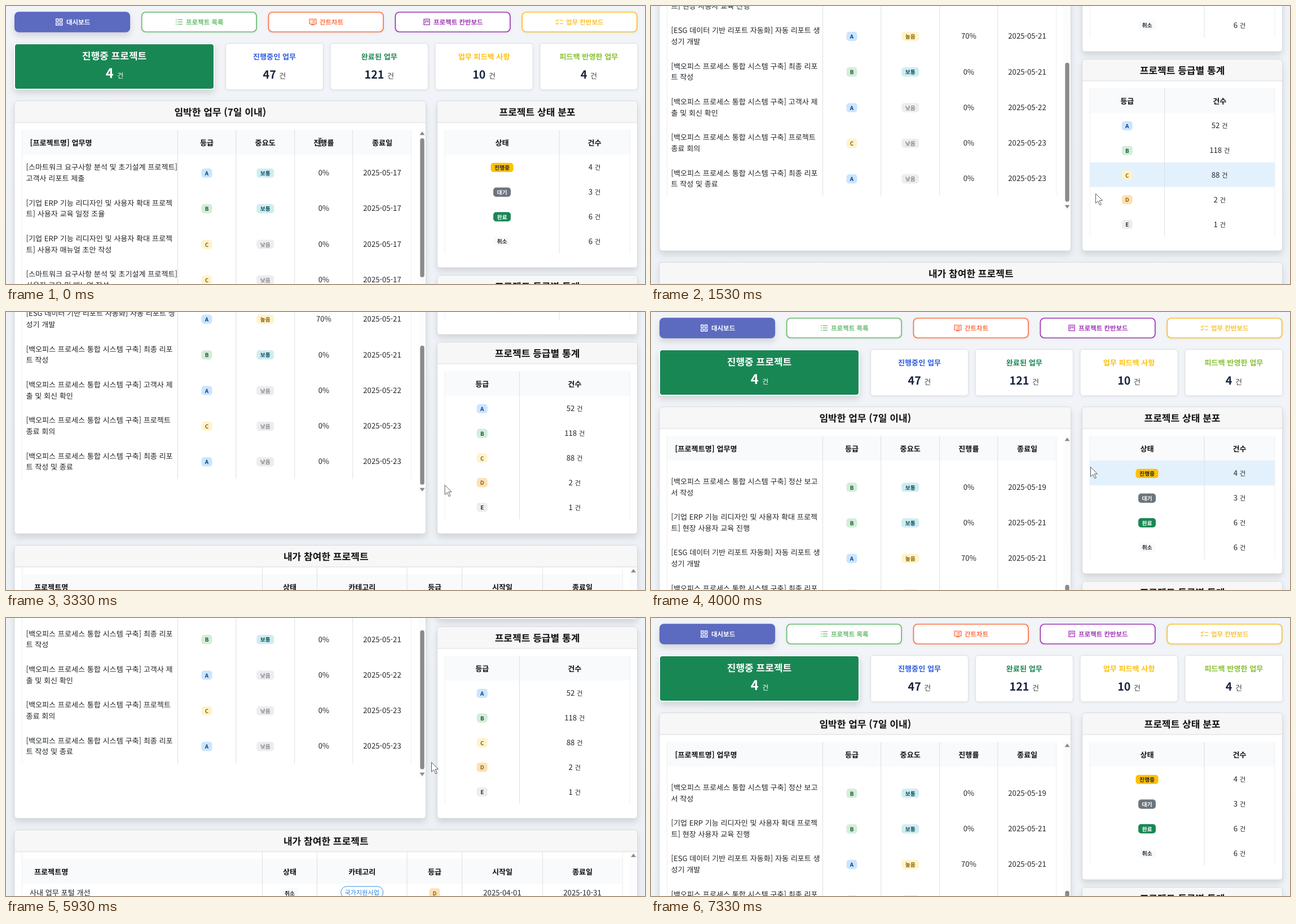
An HTML page for the animation above (7.74 s loop, 1133 px wide and 494 px high).

```html
<!DOCTYPE html>
<html lang="ko">
<head>
<meta charset="utf-8">
<style>
html, body { margin: 0; height: 100%; overflow: hidden; background: #eff3f7; }
svg { display: block; width: 1133px; height: 494px; font-family: 'Noto Sans CJK KR', 'Noto Sans KR', 'Noto Sans CJK', sans-serif; text-rendering: geometricPrecision; }
.deep { filter: drop-shadow(0 6px 6px rgba(0,0,0,.13)); }
.soft { filter: drop-shadow(0 1.5px 2px rgba(0,0,0,.07)); }
</style>
</head>
<body>
<svg id="stage" viewBox="0 0 1133 494"></svg>
<script>
const INK = '#212529', BASE = 13.12, ROW = 63.3, ROW2 = 45;

// ---- drawing helpers; text y is the visual middle of the glyphs
const text = (x, y, s, { size = BASE, fill = INK, w = 400, at = 'middle' } = {}) =>
  `<text x="${x}" y="${y + size * .37}" font-size="${size}" fill="${fill}" font-weight="${w}" text-anchor="${at}">${s}</text>`;
const rect = (x, y, w, h, fill, r = 0, more = '') =>
  `<rect x="${x}" y="${y}" width="${w}" height="${h}" rx="${r}" fill="${fill}" ${more}/>`;
const path = (d, more) => `<path d="${d}" ${more}/>`;
const bold = (x, y, s, o) => text(x, y, s, { fill: '#111', w: 700, ...o });

const badgeLook = {
  A: ['#cce5ff', '#004085'], B: ['#d4edda', '#155724'], C: ['#fff3cd', '#856404'],
  D: ['#ffe0b2', '#8a6116'], E: ['#ededf0', '#333'],
  보통: ['#d1ecf1', '#0c5460'], 낮음: ['#ededef', '#555b61'], 높음: ['#fff3cd', '#856404'],
  진행중: ['#ffc107', INK], 대기: ['#6c757d', '#fff'], 완료: ['#198754', '#fff'], 취소: ['#f8fafc', INK],
};
function badge(x, y, s) {
  const [bg, fg] = badgeLook[s];
  const w = s < 'a' ? 19 : s.length * 9.05 + 12.8;
  return rect(x - w / 2, y - 8.2, w, 16.4, bg, 4.9) +
    text(x, y + .5, s, { size: 9.84, fill: fg, w: s == '낮음' ? 500 : 700 });
}
const pill = (x, y, s) => rect(x - 37.5, y - 10.5, 75, 21, '#fff', 10.5, 'stroke="#2b8ff0"') +
  text(x, y, s, { size: 11.15, fill: '#1e80e0' });

// first and last lines are the faint outer edges
const columns = (xs, top, bottom) => xs.map((x, i) =>
  path(`M${x} ${top}V${bottom}`, `stroke="${i && i < xs.length - 1 ? '#dcdfe3' : '#eceef1'}"`)).join('');
const tableHead = (xs, y, labels) => rect(xs[0], y, xs.at(-1) - xs[0], 44, '#f8fafc') +
  columns(xs, y, y + 44) + labels.map(([x, s, at]) => bold(x, y + 22.7, s, { at })).join('');
const card = (x, y, w, h, title) => `<g class="deep">${rect(x, y, w, h, '#fff', 5)}</g>` +
  path(`M${x} ${y + 39}V${y + 5}q0-5 5-5H${x + w - 5}q5 0 5 5V${y + 39}z`, 'fill="#f7f7f7"') +
  path(`M${x} ${y + 38.5}h${w}`, 'stroke="#dcdcdc"') +
  rect(x, y, w, h, 'none', 5, 'stroke="#d8dadd"') +
  bold(x + w / 2, y + 20.1, title, { size: 17.06 });
const arrow = (x, y, dir) => path(`M${x - 4} ${y + 2.5 * dir}h8l-4 ${-5.5 * dir}z`, 'fill="#8b8b8b" stroke="#8b8b8b" stroke-width=".6" stroke-linejoin="round"');

// ---- navigation and figures
function nav() {
  const items = [
    ['대시보드', '#5c6bc0', 107, 88, 'M.7.7h4.2v4.2H.7zM7.5.7h4.2v4.2H7.5zM.7 7.5h4.2v4.2H.7zM7.5 7.5h4.2v4.2H7.5z'],
    ['프로젝트 목록', '#66bb6a', 319, 301, 'M0 2h1.8M0 6h1.8M0 10h1.8M3.5 2H12M3.5 6H12M3.5 10H12'],
    ['간트차트', '#ff7043', 556, 537, 'M1 1h12v8.5H1zM3.2 3.7h1.4M6 3.7h5M3.2 6.6h1.4M6 6.6h5M4 11.2h6'],
    ['프로젝트 칸반보드', '#9f35b3', 758, 740, 'M1 1h10v10H1zM3.6 3v5.5M6 3v3M8.4 3v4.3'],
    ['업무 칸반보드', '#fbc02d', 993, 975, 'M0 3l1.7 1.7L4.6 1.5M0 8.5l1.7 1.7L4.6 7M6.5 3.3H13M6.5 9H13'],
  ];
  return items.map(([s, c, tx, ix, d], i) => {
    const x = 15 + i * 224.85, fg = i ? c : '#fff';
    return `<g class="${i ? 'soft' : 'deep'}">${rect(x + .8, 11, 203.5, 35, i ? '#fff' : c, 7, `stroke="${c}" stroke-width="1.7"`)}</g>` +
      path(d, `transform="translate(${ix} 22.3)" fill="none" stroke="${fg}" stroke-width="1.35"`) +
      text(tx, 28.7, s, { size: 11.48, fill: fg, w: 700, at: 'start' });
  }).join('');
}
function figures() {
  const items = [['진행중인 업무', 47, '#2f5fe0'], ['완료된 업무', 121, '#198754'],
    ['업무 피드백 사항', 10, '#ffc107'], ['피드백 반영한 업무', 4, '#86c232']];
  const count = (x, y, n, size, unit, fill, fill2) => text(x, y,
    `${n} <tspan font-size="${unit}" font-weight="400" fill="${fill2}">건</tspan>`, { size, fill, w: 700 });
  return `<g class="deep">${rect(15, 67, 354, 81, '#198754', 5, 'stroke="#fff" stroke-width="2"')}</g>` +
    bold(192, 88.5, '진행중 프로젝트', { size: 17.06, fill: '#fff' }) +
    count(192.5, 119.5, 4, 23.6, 12, '#fff', '#fff') +
    items.map(([s, n, c], i) => {
      const x = 389.5 + i * 185.8;
      return `<g class="soft">${rect(x, 66.5, 173, 82.3, '#fff', 5, 'stroke="#dcdfe3"')}</g>` +
        text(x + 86.5, 90, s, { fill: c, w: 700 }) + count(x + 86.5, 122, n, 19.68, BASE, '#1a2340', '#444');
    }).join('');
}

// ---- upcoming tasks
const SMART = '[스마트워크 요구사항 분석 및 초기설계 프로젝트]', ERP = '[기업 ERP 기능 리디자인 및 사용자 확대 프로젝',
  BACK = '[백오피스 프로세스 통합 시스템 구축] ';
const tasks = [
  [SMART, '고객사 리포트 제출', 'A', '보통', 17], [ERP, '트] 사용자 교육 일정 조율', 'B', '보통', 17],
  [ERP, '트] 사용자 매뉴얼 초안 작성', 'C', '낮음', 17], [SMART, '사용자 교육 및 매뉴얼 작성', 'C', '낮음', 17],
  [ERP, '트] 기능 검수 결과 정리', 'B', '보통', 18], [SMART, '요구사항 최종 확인', 'A', '높음', 18],
  [BACK + '통합 테', '스트 진행', 'B', '보통', 18], [ERP, '트] 운영 환경 점검', 'C', '낮음', 19],
  [SMART, '초기설계 문서 검토', 'A', '보통', 19], [BACK + '정산 보고', '서 작성', 'B', '보통', 19],
  [ERP, '트] 현장 사용자 교육 진행', 'B', '보통', 21],
  ['[ESG 데이터 기반 리포트 자동화] 자동 리포트 생', '성기 개발', 'A', '높음', 21, 70],
  [BACK + '최종 리포', '트 작성', 'B', '보통', 21], [BACK + '고객사 제', '출 및 회신 확인', 'A', '낮음', 22],
  [BACK + '프로젝트', '종료 회의', 'C', '낮음', 23], [BACK + '최종 리포', '트 작성 및 종료', 'A', '낮음', 23],
];
const taskCols = [28.5, 304.5, 407.7, 511.7, 614.8, 718.5];
const taskRows = () => rect(28.5, 264 + 12 * ROW, 690, ROW, '#e3f1fd', 0, 'id="hoverTask"') +
  tasks.map(([a, b, grade, level, day, done = 0], i) => {
    const y = 296.3 + i * ROW;
    return text(35.5, y - 9.8, a, { at: 'start' }) + text(35.5, y + 9.9, b, { at: 'start' }) +
      badge(356, y + .6, grade) + badge(459.7, y + .6, level) +
      text(563.4, y, done + '%') + text(667, y, '2025-05-' + day);
  }).join('') + columns(taskCols, 264, 264 + tasks.length * ROW);

const taskCard = () => card(15, 168.5, 729.5, 650.5, '임박한 업무 (7일 이내)') +
  rect(731, 220, 13, 527, '#fcfcfc') +
  `<g clip-path="url(#taskClip)"><g id="tasks">${taskRows()}</g></g>` +
  tableHead(taskCols, 220, [[42.5, '[프로젝트명] 업무명', 'start'], [356, '등급'], [459.7, '중요도'], [563.4, '진행률'], [667, '종료일']]) +
  arrow(738, 226.5, 1) + arrow(738, 740.5, -1) + rect(734.3, 235, 7.4, 247, '#8b8b8b', 3.7, 'id="taskThumb"');

// ---- small statistics tables
function stats(y, h, title, mid, head, rows, id) {
  const xs = [778, mid, 1106], top = y + 51.8, x1 = (778 + mid) / 2, x2 = (mid + 1106) / 2, step = 43.8;
  const unit = '<tspan font-size="11.48">건</tspan>';
  return card(764.5, y, 355, h, title) + tableHead(xs, top, [[x1, head], [x2, '건수']]) +
    rect(778, 0, 328, step, '#e3f1fd', 0, `id="${id}"`) +
    rows.map(([s, n], i) => badge(x1, top + 66.6 + i * step, s) + text(x2, top + 66.3 + i * step, `${n} ${unit}`)).join('') +
    columns(xs, top + 44, top + 44 + rows.length * step);
}

// ---- my projects
const NAT = '국가지원사업', SEA = '해외협력사업';
const projects = [
  ['', '대기', NAT, 'C', '05-07', '05-21'],
  ['통합 관리 시스템 고도화 및 종료 리포트 작성', '완료', NAT, 'B', '02-01', '08-31'],
  ['백오피스 프로세스 통합 시스템 구축', '취소', SEA, 'E', '03-01', '08-31'],
  ['ESG 데이터 기반 리포트 자동화', '진행중', NAT, 'A', '03-10', '09-30'],
  ['기업 ERP 기능 리디자인 및 사용자 확대 프로젝트', '진행중', SEA, 'B', '02-15', '07-31'],
  ['스마트워크 요구사항 분석 및 초기설계 프로젝트', '완료', NAT, 'A', '01-06', '06-30'],
  ['사내 업무 포털 개선', '취소', NAT, 'D', '04-01', '10-31'],
  ['고객 지원 시스템 구축', '대기', SEA, 'C', '05-01', '11-30'],
  ['데이터 품질 관리 체계 수립', '완료', NAT, 'B', '01-20', '05-30'],
];
const projCols = [28.5, 454.5, 551.5, 711, 808.5, 951.5, 1093.5];
const spark = x => path(`M${x} 951q1 6 6 7q-5 1-6 7q-1-6-6-7q5-1 6-7zM${x + 5} 950l1 2.5 2 .8-2 .8-1 2.5-1-2.5-2-.8 2-.8z`, 'fill="#f7a23b"');
const projRows = () => spark(49) + spark(377) +
  text(62, 957.7, '푸른누리 그룹웨어 협업 시스템 구축 [', { at: 'start' }) +
  path('M270 952h8v12h-8z', 'fill="#e8909c"') + path('M274 960l6-6 2 2-6 6z', 'fill="#5b8fc9"') +
  text(286, 957.7, '신규 프로젝트]', { at: 'start' }) +
  projects.map(([name, state, kind, grade, from, to], i) => {
    const y = 957.9 + i * ROW2;
    return text(42, y - .2, name, { at: 'start' }) + badge(503, y + .5, state) + pill(631.3, y - .4, kind) +
      badge(760, y + .5, grade) + text(880, y, '2025-' + from) + text(1022, y, '2025-' + to);
  }).join('') + columns(projCols, 935, 1700);

const projCard = () => card(15, 839.5, 1104.5, 660, '내가 참여한 프로젝트') +
  rect(1106, 879, 13, 600, '#fcfcfc') +
  `<g clip-path="url(#projClip)"><g id="projects">${projRows()}</g></g>` +
  tableHead(projCols, 891, [[50, '프로젝트명', 'start'], [503, '상태'], [631.3, '카테고리'], [760, '등급'], [880, '시작일'], [1022, '종료일']]) +
  arrow(1112.5, 885, 1) + rect(1108.8, 893.5, 7.4, 380, '#8b8b8b', 3.7, 'id="projThumb"');

document.getElementById('stage').innerHTML = `
<defs>
  <linearGradient id="bg" x2="0" y2="1"><stop stop-color="#f2f4f8"/><stop offset="1" stop-color="#e9eff5"/></linearGradient>
  <clipPath id="taskClip"><rect x="15" y="264" width="720" height="483"/></clipPath>
  <clipPath id="projClip"><rect x="15" y="879" width="1090" height="596"/></clipPath>
</defs>
<g id="page">${rect(0, 0, 1133, 1550, 'url(#bg)')}${nav()}${figures()}${taskCard()}
${stats(168.5, 296.5, '프로젝트 상태 분포', 981, '상태', [['진행중', 4], ['대기', 3], ['완료', 6], ['취소', 6]], 'hoverState')}
${stats(478.5, 340.5, '프로젝트 등급별 통계', 910.5, '등급', [['A', 52], ['B', 118], ['C', 88], ['D', 2], ['E', 1]], 'hoverGrade')}
${projCard()}</g>
${path('M.5.5V17.5l4-3.8 3.2 7 2.6-1.1-3.2-6.9h5.4z', 'id="pointer" fill="#fff" stroke="#333" stroke-width=".8"')}
${path('M-3-7h2.2L0-6.2.8-7H3M0-6.2V6.2M-3 7h2.2L0 6.2.8 7H3', 'id="beam" fill="none" stroke="#111" stroke-width="1.2"')}`;

// ---- motion: keys are [tick, value...], 15 ticks per second
const LOOP = 7740, TICK = 1000 / 15;
const pageKeys = [[13, 0], [15, 40], [23, 384], [24, 407], [27, 407], [34, 567], [47, 567], [59, 0], [83, 0], [90, 540], [91, 567], [92, 540], [95, 392], [104, 15], [106, 0]];
const taskKeys = [[0, 0], [2, 50], [11, 520], [13, 555.2]];
const projKeys = [[37, 0], [38, 7], [39, 22.8], [46, 277]];
const mouseKeys = [[12, 557, 242], [15, 788, 333], [24, 788, 333], [26, 777, 323], [47, 777, 323], [56, 779, 275], [61, 779, 275],
  [72, 757, 240], [76, 757, 240], [77, 751, 245], [83, 751, 245], [95, 757, 267], [106, 600, 455], [107, 590, 472], [110, 565, 500]];

function at(keys, n) {
  const i = keys.findIndex(k => k[0] > n);
  if (i < 1) return keys.at(i).slice(1);
  const a = keys[i - 1], b = keys[i], f = (n - a[0]) / (b[0] - a[0]);
  return a.slice(1).map((v, j) => v + (b[j + 1] - v) * f);
}
const el = id => document.getElementById(id);
const move = (id, x, y) => el(id).setAttribute('transform', `translate(${x} ${y})`);
const show = (id, on) => el(id).style.display = on ? '' : 'none';

function draw(now) {
  const n = Math.floor((now % LOOP + 5) / TICK);
  const [scroll] = at(pageKeys, n), [task] = at(taskKeys, n), [proj] = at(projKeys, n), [mx, my] = at(mouseKeys, n);
  move('page', 0, -Math.round(scroll));
  move('tasks', 0, -task);
  move('taskThumb', 0, task * .45);
  move('projects', 0, -proj);
  move('projThumb', 0, proj * .7);
  move('pointer', mx, my);
  move('beam', mx, my);
  show('beam', n < 13);
  show('pointer', n >= 13);
  show('hoverState', n > 56 && n < 64);
  show('hoverGrade', n > 19 && n < 26);
  show('hoverTask', n > 106 && n < 110);
  el('hoverState').setAttribute('y', 264);
  el('hoverGrade').setAttribute('y', n < 24 ? 661.9 : 705.7);
  requestAnimationFrame(draw);
}
draw(performance.now());
</script>
</body>
</html>
```
